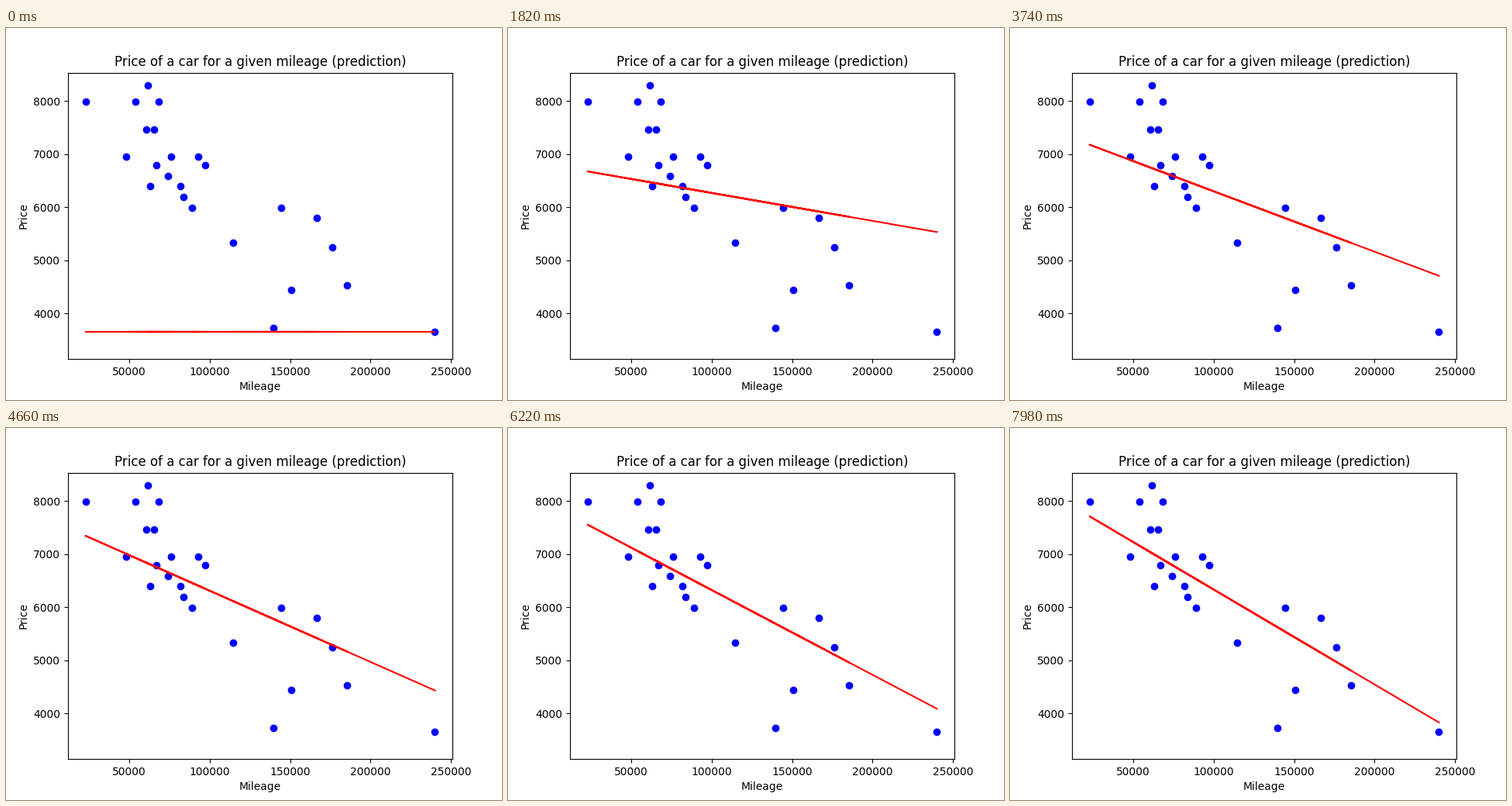
Recreate the animation shown at these times as a matplotlib script. Size 640x480 px, loop 8 s.

```python
import numpy as np
import matplotlib.pyplot as plt
from matplotlib.animation import FuncAnimation

FRAMES, INTERVAL = 400, 20
STEPS, RATE = 1000, 0.1


def price_ladder():
    """Asking prices from cheapest to dearest: pairs, then small steps, then tiers."""
    k = np.arange(6)
    cheap = 3650 + 800 * (k // 2) + 80 * (k % 2)
    k = np.arange(9)
    middle = 5795 + 200 * np.round(k * 2 / 3)
    dear = np.minimum(6950 + 520 * np.round(0.36 * k - 0.25), 8290)
    return np.concatenate([cheap, middle, dear])


def scale(v):
    return (v - v.min()) / np.ptp(v)


def train(x, y):
    """Return (bias, slope) before each gradient descent step and after the last."""
    bias = slope = 0.0
    history = [(bias, slope)]
    for _ in range(STEPS):
        err = bias + slope * x - y
        bias, slope = bias - RATE * err.mean(), slope - RATE * (err * x).mean()
        history.append((bias, slope))
    return history


price = price_ladder()
# Mileage of each car in thousands, in order of price.
km = 1000 * np.array([240, 139.8, 150.5, 185.5, 176, 114.8, 166.8, 89,
                      144.5, 84, 82, 63, 74, 97.5, 67, 76,
                      48.2, 93, 60.9, 65.7, 54, 68.5, 22.9, 61.8])
x = scale(km)
history = train(x, scale(price))


def predict(step):
    bias, slope = history[step]
    return price.min() + np.ptp(price) * (bias + slope * x)


fig, ax = plt.subplots(figsize=(6.4, 4.8), dpi=100)
ax.set_title("Price of a car for a given mileage (prediction)")
ax.set_xlabel("Mileage")
ax.set_ylabel("Price")
ax.plot(km, price, "bo")
# The fully trained line sets the axis limits.
line, = ax.plot(km, predict(STEPS), "r")


def update(i):
    line.set_ydata(predict(i))
    return line,


def init():
    return update(0)


anim = FuncAnimation(fig, update, frames=FRAMES, init_func=init,
                     interval=INTERVAL, repeat=True, repeat_delay=0)
plt.show()
```
